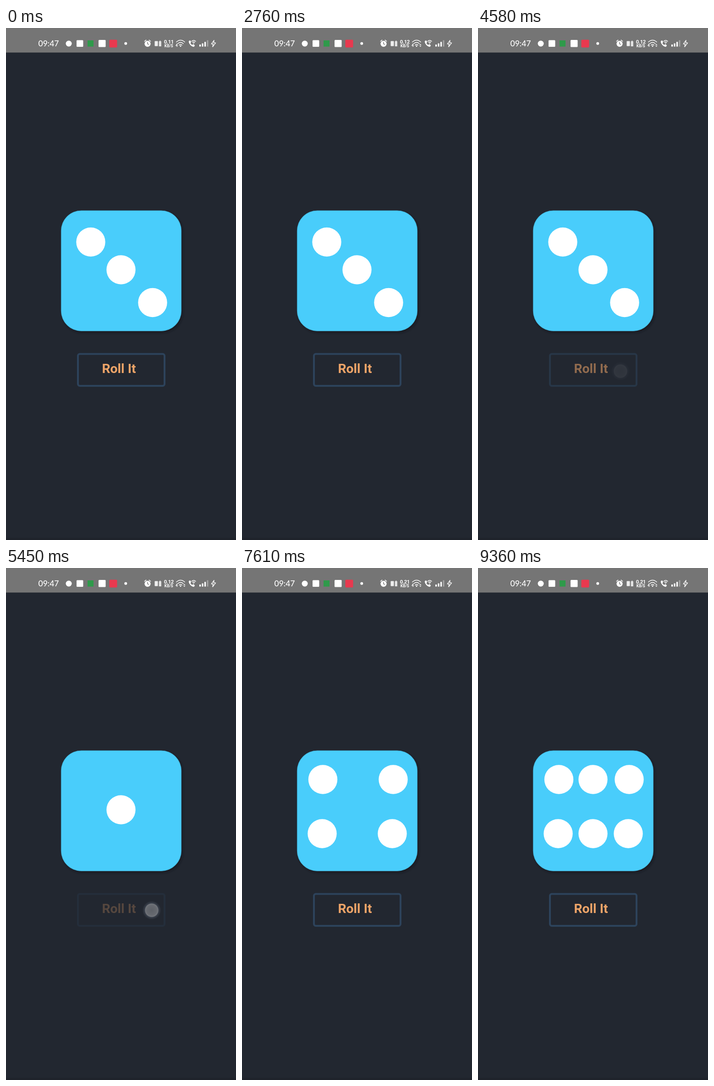
Animation of 502 by 1116 pixels, one loop 9.45 s. Source, as an HTML page:

```html
<!DOCTYPE html>
<html lang="en">
<head>
<meta charset="utf-8">
<title>Dice roller</title>
<style>
  html, body { margin: 0; width: 100%; height: 100%; overflow: hidden; background: #222730; }
  svg { display: block; width: 100%; height: 100%; }
  .clock { font: 500 17.5px Lato, sans-serif; fill: #fff; }
  .rate { font: 700 11.4px Roboto, sans-serif; letter-spacing: -.4px; fill: #fff; }
  .unit { font: 700 8.4px Roboto, sans-serif; fill: #fff; }
  .label { font: 700 28.4px Roboto, sans-serif; fill: #eea468; }
  .line { fill: none; stroke: #fff; stroke-width: 1.6; stroke-linecap: round; stroke-linejoin: round; }
</style>
</head>
<body>
<svg viewBox="0 0 502 1116" preserveAspectRatio="none">
  <defs>
    <radialGradient id="glow">
      <stop offset="0" stop-color="#fff" stop-opacity=".42"/>
      <stop offset=".5" stop-color="#fff" stop-opacity=".48"/>
      <stop offset=".69" stop-color="#fff" stop-opacity=".56"/>
      <stop offset=".74" stop-color="#b4c4dc" stop-opacity=".25"/>
      <stop offset="1" stop-color="#b4c4dc" stop-opacity="0"/>
    </radialGradient>
    <filter id="soft" x="-10%" y="-10%" width="120%" height="120%">
      <feGaussianBlur stdDeviation="2.5"/>
    </filter>
  </defs>

  <rect width="502" height="1116" fill="#222730"/>
  <rect y="1111" width="502" height="5" fill="#1f232b"/>
  <rect width="502" height="53.5" fill="#757575"/>

  <!-- status bar, left -->
  <text class="clock" x="70.5" y="40">09:47</text>
  <circle cx="137" cy="34" r="6.5" fill="#fff"/>
  <rect x="154" y="26.5" width="14.5" height="14.5" rx="1.5" fill="#fff"/>
  <rect x="178" y="27" width="13" height="13.5" fill="#2f9a4a"/>
  <rect x="202" y="26" width="15.5" height="15.5" rx="1.5" fill="#fff"/>
  <rect x="225.5" y="25.5" width="17" height="17" rx="2" fill="#e8394f"/>
  <circle cx="261.3" cy="33.7" r="3" fill="#fff"/>

  <!-- status bar, right -->
  <circle cx="309" cy="34.3" r="6.6" fill="#fff"/>
  <path class="line" d="M302.4 29l3.2-2.7M315.6 29l-3.2-2.7"/>
  <path d="M309 30.5v4l2.8 1.7" fill="none" stroke="#757575" stroke-width="1.4"/>
  <rect x="324.5" y="28.5" width="7" height="11" rx="1" fill="#eee"/>
  <path d="M335.3 27.5h2v1.5h1.6v11h-5.2v-11h1.6z" fill="#e4e4e4"/>
  <text class="rate" id="rate" x="355.3" y="33.8" text-anchor="middle">0.11</text>
  <text class="unit" x="355.3" y="42" text-anchor="middle">KB/S</text>
  <path class="line" d="M372 30.5q9-8 18 0M375 34q6-5.2 12 0M378 37.2q3-2.4 6 0"/>
  <circle cx="381" cy="39.5" r="1.5" fill="#fff"/>
  <text class="unit" x="370" y="41">4</text>
  <path id="arrows" d="M387 37l2.3-2.6 2.3 2.6zM387 38.6h4.6l-2.3 2.6z" fill="#fff"/>
  <path d="M399 28.3l3.2-1.3 2 4-1.9 1.7q1.6 3 4.2 4.4l1.9-1.8 3.8 2.2-1.6 3.2q-3 1-7-2.5-5.2-4.8-4.6-9.9z" fill="#fff"/>
  <path class="line" stroke-width="1.3" d="M405.3 29q4.3-4 8.6 0M407.5 31.4q2.1-1.9 4.2 0"/>
  <circle cx="409.6" cy="33.6" r="1.1" fill="#fff"/>
  <path d="M422 36h3.2v4.5H422zM427.5 33.5h3.2v7h-3.2zM433 30.3h3.2v10.2H433z" fill="#fff"/>
  <path d="M438.5 26.7h3v13.8h-3z" fill="#fff" opacity=".35"/>
  <path class="line" style="stroke-width:1.4" d="M454 26.8l-5.8 8h4l-1.2 6.2 6.6-8.6h-4.2z"/>

  <!-- die -->
  <rect x="123" y="401.5" width="262" height="262" rx="44" fill="#14171c" opacity=".8" filter="url(#soft)"/>
  <rect x="120.3" y="398" width="262.4" height="262.4" rx="44" fill="#49cdfb" stroke="#3d9dc2" stroke-width=".8"/>
  <g id="pips" fill="#fff"></g>

  <g id="button">
    <rect x="157" y="710.6" width="189" height="69.3" rx="4" fill="none" stroke="#2d435b" stroke-width="4"/>
    <text class="label" x="209.4" y="752">Roll It</text>
  </g>
  <circle id="touch" r="20.5" fill="url(#glow)"/>
</svg>
<script>
const LOOP = 9450;
const $ = id => document.getElementById(id);

const TL = [176.5, 461], TM = [251, 461], TR = [330, 461];
const BL = [175, 579], BM = [251, 579], BR = [328, 579];
const MID = [251, 527];
const FACES = {
  1: [MID],
  2: [[200, 527], [296.5, 530]],
  3: [[185, 466.5], MID, [320, 598.5]],
  4: [TL, TR, BL, BR],
  6: [TL, TM, TR, BL, BM, BR]
};

// press start, end of recovery, face rolled, touch x, touch y
const PRESSES = [
  [30, 330, 4, 318, 746],
  [1270, 1640, 6, 318, 745],
  [2300, 2760, 3, 320, 745],
  [3270, 3670, 2, 318, 747],
  [4360, 4730, 3, 311, 748],
  [5270, 5670, 1, 318, 746],
  [6120, 6520, 4, 329, 740],
  [7140, 7610, 4, 326, 743],
  [8030, 8450, 1, 324, 744],
  [9030, 9360, 6, 322, 744]
];
const ROLL = 285, FADE = 265, LIFT = 270;

// time, transfer rate, arrow opacity
const STATUS = [[0, '0.11', 0], [1000, '0.11', .25], [2600, '0.12', .9], [7350, '0.21', .9]];

const clamp = v => Math.max(0, Math.min(1, v));
const ease = p => p < .5 ? 2 * p * p : 1 - 2 * (1 - p) * (1 - p);

let shown = 0;
function showFace(n) {
  if (n === shown) return;
  shown = n;
  $('pips').innerHTML = FACES[n].map(([x, y]) => `<circle cx="${x}" cy="${y}" r="31.7"/>`).join('');
}

function draw(t) {
  let face = 3, opacity = 1, touch = 0;
  for (const [start, end, value, x, y] of PRESSES) {
    if (t >= end - ROLL) face = value;
    if (t < start || t >= end) continue;
    opacity = .2 + .8 * ease(clamp((t - end + FADE) / 250));
    touch = 1 - clamp((t - end + LIFT) / 140);
    $('touch').setAttribute('cx', x);
    $('touch').setAttribute('cy', y);
  }
  showFace(face);
  $('button').setAttribute('opacity', opacity);
  $('touch').setAttribute('opacity', touch);
  const [, rate, arrows] = STATUS.filter(s => s[0] <= t).pop();
  $('rate').textContent = rate;
  $('arrows').setAttribute('opacity', arrows);
}

const origin = performance.now();
function tick() {
  draw((performance.now() - origin) % LOOP);
  requestAnimationFrame(tick);
}
draw(0);
requestAnimationFrame(tick);
</script>
</body>
</html>
```
